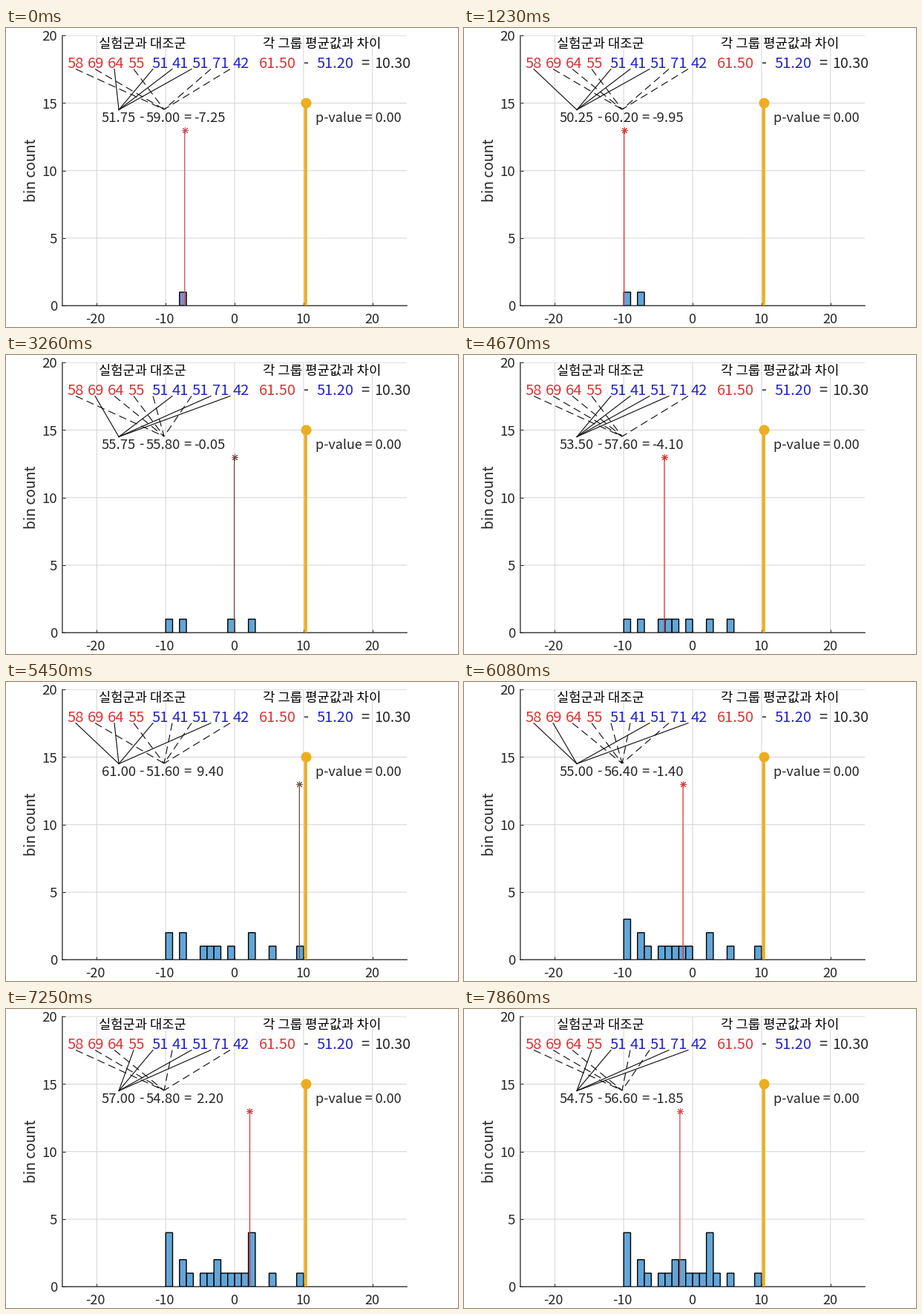
A matplotlib script that plays this animation: 609x404 px, repeating every 8 s.

```python
import math
from collections import Counter

import matplotlib.pyplot as plt
from matplotlib.animation import FuncAnimation

W, H, DPI = 609, 404, 100
LOOP, STEP = 8000, 40
PT = 72 / DPI  # points per pixel

RED, BLUE, ORANGE, BAR = "#dc3535", "#2424cc", "#ecae20", "#62a6d9"
INK = "#262626"
SCORES = [58, 69, 64, 55, 51, 41, 51, 71, 42]

# start time (ms), members of the first group, stem colour
DRAWS = [
    (0, "2456", "#cc5058"), (1230, "0456", RED), (2090, "2678", "#d83a3a"),
    (3260, "1578", "#7a4a42"), (4050, "0346", RED), (4250, "1348", RED),
    (4450, "0278", RED), (4670, "4567", "#e02c2c"), (4820, "2358", RED),
    (5030, "0348", RED), (5240, "0146", RED), (5450, "0247", "#70503e"),
    (5680, "1458", RED), (5830, "2468", RED), (6080, "0168", RED),
    (6230, "1248", RED), (6430, "0234", RED), (6610, "0138", "#2a1c20"),
    (6860, "0468", RED), (7080, "3457", RED), (7250, "3467", RED),
    (7550, "1238", RED), (7860, "3478", "#d84a4a"),
]


def means(members):
    s = sum(SCORES[int(c)] for c in members)
    return s / 4, (sum(SCORES) - s) / 5


DIFFS = [round(a - b, 2) for a, b in (means(m) for _, m, _ in DRAWS)]

plt.rcParams["font.family"] = "Noto Sans CJK JP"
plt.rcParams["axes.unicode_minus"] = False
plt.rcParams["path.snap"] = False
fig = plt.figure(figsize=(W / DPI, H / DPI), dpi=DPI, facecolor="white")

# Plot area
L, R, T, B = 75.9, 540.2, 10.2, 375.2
ax = fig.add_axes([L / W, 1 - B / H, (R - L) / W, (B - T) / H])
ax.set(xlim=(-25, 25), ylim=(0, 20), xticks=range(-20, 21, 10),
       yticks=range(0, 21, 5))
ax.set_axisbelow(True)
ax.grid(color="#d4d4d4", lw=PT)
ax.tick_params(direction="in", length=4 * PT, width=PT, color=INK,
               labelbottom=False, labelleft=False)
for side in ("top", "right"):
    ax.spines[side].set_visible(False)
for side in ("left", "bottom"):
    ax.spines[side].set(color=INK, linewidth=1.3 * PT)

# Overlay in pixel coordinates
pix = fig.add_axes([0, 0, 1, 1])
pix.set(xlim=(0, W), ylim=(H, 0))
pix.axis("off")


def label(x, y, s, size=18.5, color=INK, **kw):
    return pix.text(x, y, s, fontsize=size * PT, color=color,
                    va=kw.pop("va", "baseline"), **kw)


for v in range(-20, 21, 10):
    label(307.5 + 9.3 * v - (1 if v < 0 else 0), 398.7, str(v), 18.2,
          ha="center")
for v in range(0, 21, 5):
    label(69, 382.3 - 18.25 * v, str(v), 18.6, ha="right")
label(34, 192.5, "bin count", 19.3, rotation=90, ha="center", va="center")

label(183.5, 26.7, "실험군과 대조군", 17.6, "black", ha="center")
label(426, 26.7, "각 그룹 평균값과 차이", 17.8, "black", ha="center")
for i, v in enumerate(SCORES):
    label(94 + 27.1 * i + (5.5 if i > 3 else 0), 53.8, str(v), 20.2,
          RED if i < 4 else BLUE, ha="center")
label(340.5, 53.8, "61.50", 20, RED)
label(404, 53, "-", 20, ha="center")
label(418, 53.8, "51.20", 20, BLUE)
label(483.5, 53.8, "=", 20, ha="center")
label(496, 53.8, "10.30", 19.6)
label(417, 127, "p-value = 0.00", 18)

first = label(128.5, 127, "")
label(182, 126, "-", ha="center")
second = label(189, 127, "")
label(244.5, 127, "=", ha="center")
diff = label(253, 127, "")

links = [pix.plot([], [], color="#111111", lw=1.15 * PT)[0] for _ in SCORES]

# Histogram, moving stem and observed difference
bins = range(-25, 25)
bars = ax.bar(bins, [0] * 50, width=1, align="edge", fc=BAR, ec="black",
              lw=1.4 * PT, zorder=2)
stem, = ax.plot([], [], lw=1.3 * PT, zorder=3)
star, = ax.plot([], [], ls="", marker=(8, 2, 0), ms=9 * PT, mew=PT, zorder=5)
ax.plot([10.3, 10.3], [0, 15], color=ORANGE, lw=4.2 * PT, zorder=4,
        solid_capstyle="butt")
ax.plot([10.3], [15], "o", color=ORANGE, ms=14 * PT, mew=0, zorder=4)


def update(k):
    n = sum(t < (k + 1) * STEP for t, _, _ in DRAWS)
    _, members, tint = DRAWS[n - 1]
    d = DIFFS[n - 1]

    for i, line in enumerate(links):
        chosen = str(i) in members
        line.set_data([94 + 26 * i, 152 if chosen else 213],
                      [55.5, 110.5 if chosen else 110])
        line.set_linestyle("-" if chosen else (0, (9, 5)))

    a, b = means(members)
    first.set_text(f"{a:.2f}")
    second.set_text(f"{b:.2f}")
    diff.set_text(f"{d:5.2f}")

    counts = Counter(math.floor(v) for v in DIFFS[:n])
    for x, bar in zip(bins, bars):
        bar.set_height(counts[x])
        bar.set_visible(counts[x] > 0)
        bar.set_facecolor(BAR if n > 1 else "#868dc8")

    stem.set_data([d, d], [0, 13])
    star.set_data([d], [13])
    for part in (stem, star):
        part.set_color(tint)
    return [*links, first, second, diff, *bars, stem, star]


anim = FuncAnimation(fig, update, frames=LOOP // STEP, interval=STEP,
                     repeat=True, repeat_delay=0)
plt.show()
```
